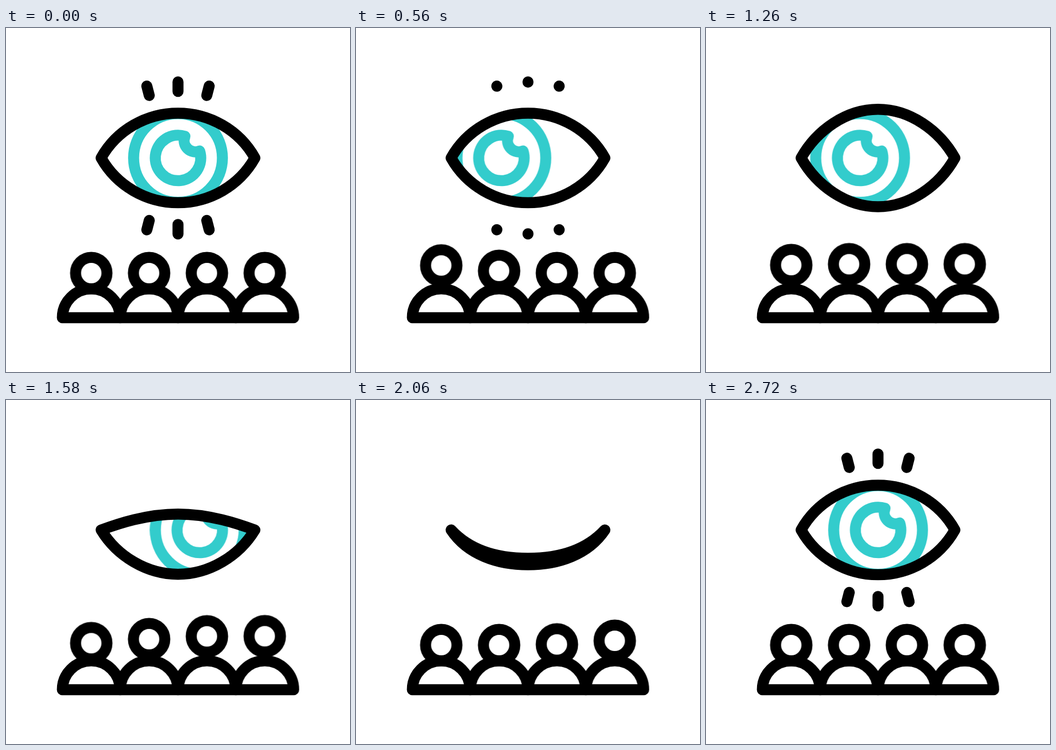
An HTML page that plays this animation: 640x640 px, repeating every 3 s.

```html
<!DOCTYPE html>
<html lang="en">
<head>
<meta charset="utf-8">
<title>Audience eye</title>
<style>
  html, body { margin: 0; width: 100%; height: 100%; overflow: hidden; background: #fff; }
  svg { display: block; width: 100vw; height: 100vh; fill: none; stroke: #000; stroke-width: 20.5; stroke-linecap: round; stroke-linejoin: round; }

  .lid, .iris, .head, .rays line { animation: 3s cubic-bezier(.333, 0, .667, 1) infinite; }

  .lid {
    --open: path("M177 241.75C206 190 261 158.5 320 158.5S434 190 463 241.75C434 293.5 379 325 320 325S206 293.5 177 241.75Z");
    d: path("M177 241.75C206 190 261 158.5 320 158.5S434 190 463 241.75C434 293.5 379 325 320 325S206 293.5 177 241.75Z");
    animation-name: blink;
  }
  .iris { stroke: #3cc; animation-name: look; }
  .head { animation-name: rise; animation-delay: calc(var(--i) * 200ms); }
  .rays { animation: toggle 3s step-end infinite; }
  .rays line { stroke-dasharray: 1 3; animation-name: trim; }

  /* open, widen, shut, open again */
  @keyframes blink {
    0%, 36.67%, 80.17%, 100% { d: path("M177 241.75C206 190 261 158.5 320 158.5S434 190 463 241.75C434 293.5 379 325 320 325S206 293.5 177 241.75Z"); }
    46.67% { d: path("M177 241.75C206 190 261 145.5 320 145.5S434 190 463 241.75C434 293.5 379 338.5 320 338.5S206 293.5 177 241.75Z"); }
    59.67%, 68.33% { d: path("M177 241.75C212 280 262 295 320 295S428 280 463 241.75C432 288 376 306.5 320 306.5S208 288 177 241.75Z"); }
  }
  @keyframes look {
    0%, 6.7%, 91.3%, 100% { transform: translateX(0); }
    19.4%, 37% { transform: translateX(-50px); }
    56.4%, 72.5% { transform: translateX(50px); }
  }
  @keyframes rise {
    0%, 7%, 59%, 100% { transform: translateY(0); }
    22.3%, 38% { transform: translateY(-16.5px); }
  }
  /* shrink to the outer end, later grow from the inner end */
  @keyframes trim {
    0%, 6.7% { stroke-dasharray: 1 3; stroke-dashoffset: 0; }
    19.4%, 50% { stroke-dasharray: .01 3; stroke-dashoffset: 0; }
    50.01%, 78% { stroke-dasharray: .01 3; stroke-dashoffset: -.99; }
    91.8%, 100% { stroke-dasharray: 1 3; stroke-dashoffset: 0; }
  }
  @keyframes toggle {
    0% { opacity: 1; }
    19.4% { opacity: 0; }
    78.1%, 100% { opacity: 1; }
  }
</style>
</head>
<body>
<svg viewBox="0 0 640 640">
  <defs>
    <clipPath id="eye"><path class="lid"/></clipPath>
    <path id="body" d="M-53.75 539A53.75 53.75 0 0 1 53.75 539Z"/>
    <circle id="face" cy="456" r="29.2"/>
  </defs>

  <g clip-path="url(#eye)">
    <g class="iris">
      <circle cx="320" cy="241.75" r="82.6"/>
      <path d="M333 201.5A42.3 42.3 0 1 0 360.3 228.8A20.9 20.9 0 0 1 333 201.5Z"/>
    </g>
  </g>
  <path class="lid"/>

  <g class="rays">
    <line pathLength="1" x1="262" y1="108" x2="266.5" y2="125.5"/>
    <line pathLength="1" x1="320" y1="100.3" x2="320" y2="118"/>
    <line pathLength="1" x1="378" y1="108" x2="373.5" y2="125.5"/>
    <line pathLength="1" x1="262" y1="375.5" x2="266.5" y2="358"/>
    <line pathLength="1" x1="320" y1="383.2" x2="320" y2="365.5"/>
    <line pathLength="1" x1="378" y1="375.5" x2="373.5" y2="358"/>
  </g>

  <g transform="translate(158.6 0)"><use href="#body"/><g class="head" style="--i:0"><use href="#face"/></g></g>
  <g transform="translate(266.2 0)"><use href="#body"/><g class="head" style="--i:1"><use href="#face"/></g></g>
  <g transform="translate(373.8 0)"><use href="#body"/><g class="head" style="--i:2"><use href="#face"/></g></g>
  <g transform="translate(481.4 0)"><use href="#body"/><g class="head" style="--i:3"><use href="#face"/></g></g>
</svg>
</body>
</html>
```
